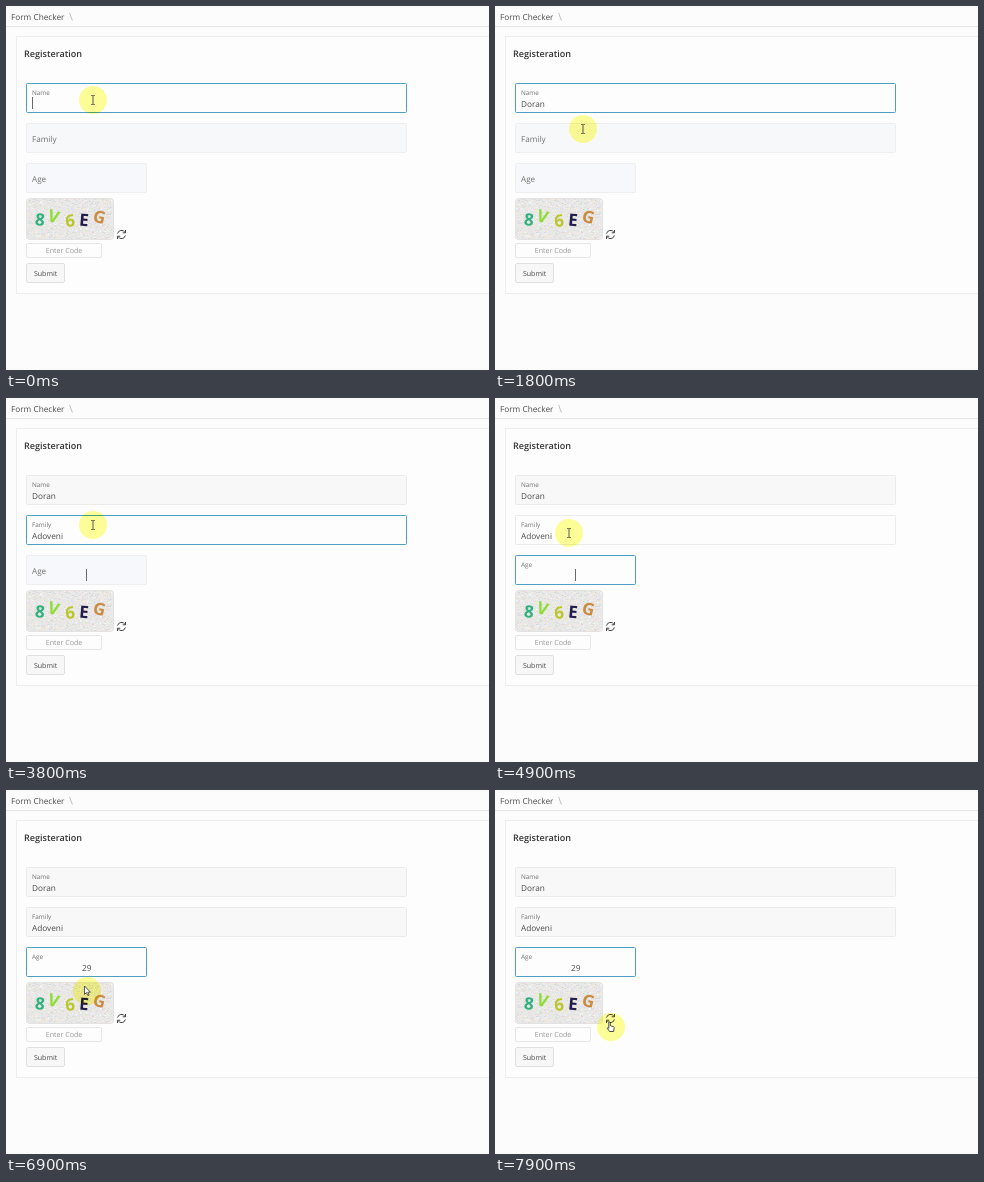
These frames come from a looping animation (483 by 364 pixels, 8000 ms). An HTML page:

```html
<!DOCTYPE html>
<html lang="en">
<head>
<meta charset="utf-8">
<title>Registration form</title>
<style>
  html, body { margin: 0; width: 100%; height: 100%; overflow: hidden; background: #fcfcfc; }
  svg { display: block; width: 483px; height: 364px; }
  text {
    font: 8.25px "Open Sans", "Noto Sans", sans-serif;
    fill: #4a4a4a;
    text-rendering: geometricPrecision;
    white-space: pre;
  }
  .label { fill: #707070; }
  .small { font-size: 7.05px; }
  .middle { text-anchor: middle; }
  .title { font-size: 9.05px; font-weight: 600; fill: #333; }
  .code text { font-size: 17px; font-weight: 700; text-anchor: middle; }
  .glow { fill: #ffff98; mix-blend-mode: multiply; }
  .icon { fill: none; stroke: #444; }
</style>
</head>
<body>
<svg viewBox="0 0 483 364">
  <rect width="483" height="364" fill="#fcfcfc"/>
  <text x="5" y="13.5">Form Checker</text>
  <path d="M63.6 7l2.8 7.5" stroke="#b0b0b0" stroke-width=".8"/>
  <path d="M0 20.5h483" stroke="#e4e4e4"/>
  <rect x="10.5" y="30.5" width="500" height="257" fill="#fdfdfd" stroke="#eeeeee"/>
  <text class="title" x="18" y="50.6">Registeration</text>

  <g id="fields"></g>

  <rect x="20.5" y="192.5" width="87" height="41" rx="3" fill="#e9e9e9" stroke="#e2e2e2"/>
  <g id="noise" stroke-width="1.2"></g>
  <g class="code" id="code"></g>

  <g class="icon" stroke-width="1">
    <path d="M111.6 227.6a4 4 0 0 1 7.4-1.2M119.4 229.4a4 4 0 0 1-7.4 1.2"/>
    <path d="M119.5 224v2.8h-2.8M111.5 233v-2.8h2.8"/>
  </g>

  <rect x="20.5" y="237.5" width="75" height="14" rx="1.5" fill="#fdfdfd" stroke="#e6e6e6"/>
  <text class="small middle" x="58" y="247.2" style="fill:#979797">Enter Code</text>
  <rect x="20.5" y="257.5" width="38" height="19" rx="1.5" fill="#f7f7f7" stroke="#e0e0e0"/>
  <text class="small middle" x="39.6" y="269.8">Submit</text>

  <g id="mouse">
    <circle class="glow" r="14"/>
    <path id="beam" class="icon" d="M-1.8-4.5h1.3l.5.5.5-.5h1.3M0-4v8M-1.8 4.5h1.3l.5-.5.5.5h1.3" stroke-width=".9"/>
    <path id="arrow" d="M-2.5-5v8.4l2-1.8 1.3 3 1.3-.6-1.3-2.8h2.6z" fill="#fff" stroke="#333" stroke-width=".8"/>
    <path id="hand" d="M-2.2-4.6q.8-.9 1.5 0v3.4l3.4.9q.6.3.5 1l-.6 3.8h-4l-2.4-3.3q.2-1 1.6 0z" fill="#fff" stroke="#222" stroke-width=".8"/>
  </g>
</svg>
<script>
const LOOP = 8000, STEP = 100, BLINK = 530, FLOAT = 200;
const $ = id => document.getElementById(id);
const clamp = v => Math.max(0, Math.min(1, v));
const mix = (a, b, k) => a + (b - a) * k;

function add(parent, tag, attrs, text) {
  const el = document.createElementNS("http://www.w3.org/2000/svg", tag);
  for (const key in attrs) el.setAttribute(key, attrs[key]);
  if (text) el.textContent = text;
  return parent.appendChild(el);
}

// Each field is focused from `on` to `off`; `filled` is when its blurred tint sets in.
const fields = [
  { label: "Name", y: 77, w: 380, on: -500, off: 1800, filled: 1900, idle: "#f7f7f8" },
  { label: "Family", y: 117, w: 380, on: 1800, off: 3800, filled: 6700, idle: "#f7f8f9" },
  { label: "Age", y: 157, w: 120, on: 3800, off: 9000, filled: 9000, idle: "#f6f8fb", centered: true }
];

for (const f of fields) {
  f.box = add($("fields"), "rect", { x: 20.5, y: f.y + .5, width: f.w, height: 29, rx: 1 });
  f.tag = add($("fields"), "text", { x: 26, class: "label" }, f.label);
  f.value = add($("fields"), "text", {
    x: f.centered ? 80.7 : 26, y: f.y + 23.8, class: f.centered ? "middle" : ""
  });
  f.caret = add($("fields"), "rect", { y: f.y + 14, width: 1, height: 12, fill: "#6a6a6a" });
}

// [time, field, content]; every entry also restarts the caret blink.
const typing = [
  [0, 0, ""], [200, 0, "D"], [500, 0, "Do"], [600, 0, "Dor"], [900, 0, "Dora"], [1000, 0, "Doran"],
  [1900, 1, ""], [2300, 1, "A"], [2800, 1, "Ad"], [2900, 1, "Ado"],
  [3100, 1, "Adov"], [3200, 1, "Adove"], [3300, 1, "Adoven"], [3400, 1, "Adoveni"],
  [3800, 2, ""], [3850, 2, ""], [5500, 2, "2"], [6200, 2, "29"]
];

// [time, x, y]
const path = [
  [0, 87, 94], [1400, 87, 94], [1500, 89, 101], [1800, 88, 123], [1900, 87, 127],
  [3800, 87, 127], [4200, 74, 135], [6600, 74, 135], [6700, 75, 149], [6900, 81, 201],
  [7100, 90, 228], [7300, 103, 243], [7500, 109, 248], [7700, 114, 242], [7900, 116, 237], [8000, 116, 237]
];

function drawCode() {
  let seed = 7;
  const rand = () => (seed = seed * 16807 % 2147483647) / 2147483647;
  for (const color of ["#f6f6f6", "#f8e3e6", "#dcebdd", "#dfe2f0", "#d9d9d9", "#efe6d4"]) {
    let d = "";
    for (let i = 0; i < 330; i++) {
      d += `M${21 + Math.floor(rand() * 85)} ${193.5 + Math.floor(rand() * 40)}h1.3`;
    }
    add($("noise"), "path", { d, stroke: color });
  }
  const glyphs = [
    ["8", 34, 213.5, 6, "#2fb07c"], ["V", 47.5, 210.5, 17, "#8fdc35"], ["6", 64, 214.5, -5, "#b9c828"],
    ["E", 78, 214, 5, "#211c4a"], ["G", 93.5, 211, 14, "#c88c45"]
  ];
  for (const [char, x, y, turn, fill] of glyphs) {
    add($("code"), "text", { y: 6, transform: `translate(${x} ${y}) rotate(${turn})`, style: `fill:${fill}` }, char);
  }
}

function drawField(f, i, t) {
  const focused = t > f.on && t <= f.off;
  const lift = clamp((t - f.on) / FLOAT);
  const touched = t > f.on;
  f.box.setAttribute("fill", !touched ? f.idle : t >= f.filled ? "#f8f8f8" : "#fdfdfd");
  f.box.setAttribute("stroke", focused ? "#4f9fc4" : touched ? "#ebebeb" : "#eeeeee");
  f.tag.style.fontSize = mix(8.15, 6.4, lift) + "px";
  f.tag.setAttribute("y", f.y + mix(18.6, 11.6, lift));

  const past = typing.filter(e => e[0] <= t);
  const own = past.filter(e => e[1] === i).pop();
  const last = past[past.length - 1];
  f.value.textContent = own ? own[2] : "";
  const lit = last[1] === i && Math.floor((t - last[0] + 30) / BLINK) % 2 === 0;
  f.caret.style.display = lit ? "" : "none";
  const len = f.value.getComputedTextLength();
  f.caret.setAttribute("x", Math.round(f.centered ? 80.3 + len / 2 : 26 + len));
}

function drawMouse(t) {
  const n = path.findIndex(p => p[0] > t);
  const [a, b] = [path[n - 1], path[n]];
  const k = (t - a[0]) / (b[0] - a[0]);
  const x = mix(a[1], b[1], k), y = mix(a[2], b[2], k);
  $("mouse").setAttribute("transform", `translate(${x} ${y})`);
  const inField = fields.some(f => y > f.y && y < f.y + 30 && x < 20 + f.w);
  const shape = inField ? "beam" : x > 112 ? "hand" : "arrow";
  for (const id of ["beam", "arrow", "hand"]) $(id).style.display = id === shape ? "" : "none";
}

function render(t) {
  fields.forEach((f, i) => drawField(f, i, t));
  drawMouse(t);
}

const start = performance.now();
let shown = -1;
function tick() {
  const t = Math.floor((performance.now() - start) % LOOP / STEP) * STEP;
  if (t !== shown) render(shown = t);
  requestAnimationFrame(tick);
}
drawCode();
tick();
</script>
</body>
</html>
```
